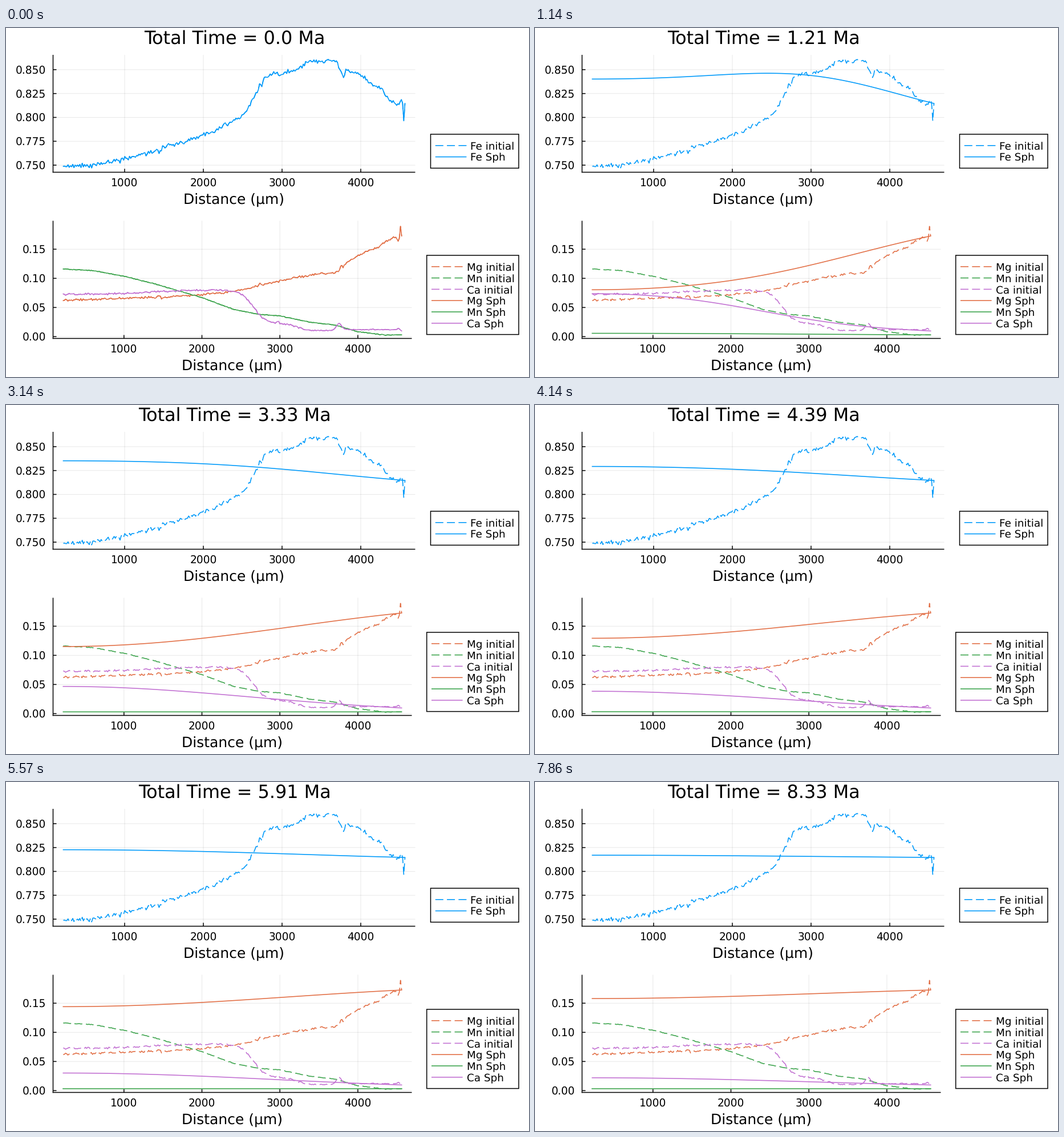
Write a matplotlib script that moves like this. It is 917 by 611 pixels and loops after 8000 ms.

```python
import numpy as np
import matplotlib.pyplot as plt
from matplotlib.animation import FuncAnimation
from matplotlib.patches import Rectangle

W, H = 917, 611
STATES = 56                         # pictures in one loop, seven per second
STEP = 15 / 99                      # Ma between pictures
TICK = 40                           # ms per drawn frame
LOOP = 8000
X0, X1 = 220.8, 4561.5              # profile ends, in micrometres
BLUE, ORANGE, GREEN, PURPLE = "#009afa", "#e26f46", "#3da44d", "#c271d2"
TRIO = (ORANGE, GREEN, PURPLE)
LW = 1.6
DASH = (14, 6.3)

plt.rcParams.update({"font.family": "DejaVu Sans", "text.hinting": "none",
                     "lines.scale_dashes": False})
rng = np.random.default_rng(4)


def rise(u, at, width):
    return 1 / (1 + np.exp(-(u - at) / width))


def bump(u, at, width):
    return np.exp(-((u - at) / width) ** 2)


def magnesium(u):
    trend = .0615 + .0042 * u + .0345 * rise(u, 2.85, .3)
    rim = .0155 * rise(u, 3.8, .025) + .064 * (np.clip(u, 3.84, 4.47) - 3.84)
    detail = (.0025 * bump(u, 1.435, .02) - .003 * bump(u, 1.49, .02)
              + .003 * bump(u, 2.74, .03) + .01 * bump(u, 3.787, .01)
              - .003 * bump(u, 4.24, .05))
    spike = .0205 * bump(u, 4.549, .008) - .007 * bump(u, 4.515, .015)
    return trend + rim + detail + spike


def manganese(u):
    keys = [(.2, .116), (.6, .1135), (1, .1035), (1.4, .0905), (2, .067), (2.4, .047),
            (2.75, .038), (3, .0355), (3.4, .0245), (3.72, .0195), (4, .0085), (4.35, .0027)]
    return np.interp(u, *zip(*keys)) + .0003 * rise(u, 4.45, .02)


def calcium(u):
    return (.0725 + .0075 * rise(u, 1.3, .25) - .058 * rise(u, 2.66, .08)
            - .0115 * rise(u, 3.22, .06) + .0015 * rise(u, 3.75, .05)
            + .011 * bump(u, 3.76, .05) + .003 * bump(u, 2.98, .02)
            + .0025 * bump(u, 4.52, .015) - .0025 * rise(u, 4.55, .005))


def jitter(u, size):
    return np.clip(rng.normal(0, size, u.size), -2 * size, 2 * size) * (u < 4.5)


def diffuse(c):
    """Multicomponent diffusion of Mg, Mn, Ca in a sphere with a fixed rim."""
    d = np.array([.2806, 3.02, .2038]) / np.pi ** 2
    d_fe = .4077 / np.pi ** 2
    n = c.shape[1]
    r = np.linspace(0, 1, n)
    mid = (r[1:] + r[:-1]) / 2
    vol = np.diff(np.concatenate([[0], mid, [1]]) ** 3) / 3
    diff = (np.eye(n, k=1) - np.eye(n))[:-1]
    grad = diff * (n - 1)
    div = -(diff.T * mid ** 2) / vol[:, None]
    div[-1] = 0
    unit = np.eye(3 * n)

    def block(i, j, face, total):
        k = d[i] * (i == j) - d[i] * face[i] * (d[j] - d_fe) / total
        return div @ (k[:, None] * grad)

    states = [c]
    for k in range(1, STATES):
        sub = 10 if k <= 10 else 3
        for _ in range(sub):
            face = (c[:, 1:] + c[:, :-1]) / 2
            total = d @ face + d_fe * (1 - face.sum(axis=0))
            op = np.block([[block(i, j, face, total) for j in range(3)] for i in range(3)])
            c = np.linalg.solve(unit - STEP / sub * op, c.ravel()).reshape(3, n)
        states.append(c)
    return states


fig = plt.figure(figsize=(917.001 / 72, 611.001 / 72), dpi=72, facecolor="white")
ax = fig.add_axes([0, 0, 1, 1])
ax.set_xlim(0, W)
ax.set_ylim(H, 0)
ax.axis("off")


def rule(x, y, color="black", lw=1.5, **kw):
    return ax.plot(x, y, color=color, lw=lw, snap=False, solid_capstyle="butt", **kw)[0]


def label(x, y, text, size, ha="center"):
    return ax.text(x, y, text, fontsize=size, ha=ha, va="baseline", color="black")


class Panel:
    """Plot area in stage pixels with linear data scales."""

    def __init__(self, right, top, bottom, ylim, ticks, fmt):
        self.left, self.right, self.top, self.bottom = 82.5, right, top, bottom
        self.ylim = ylim
        for v in (1000, 2000, 3000, 4000):
            x = self.px(v)
            rule([x, x], [top, bottom], lw=1, alpha=.09)
            rule([x, x], [bottom, bottom - 6])
            label(x, bottom + 24, str(v), 18.6)
        for v in ticks:
            y = self.py(v)
            rule([self.left, right], [y, y], lw=1, alpha=.09)
            rule([self.left, self.left + 6], [y, y])
            label(70.5, y + 6.7, fmt % v, 18.6, "right")
        rule([self.left, self.left], [top, bottom + .75])
        rule([self.left - .75, right], [bottom, bottom])
        label((self.left + right) / 2, bottom + 55.5, "Distance (µm)", 25)

    def px(self, v):
        return self.left + (np.asarray(v) - 90.6) / 4601.2 * (self.right - self.left)

    def py(self, v):
        lo, hi = self.ylim
        return self.bottom - (np.asarray(v) - lo) / (hi - lo) * (self.bottom - self.top)

    def curve(self, x, y, color, dashed=False):
        line = ax.plot(self.px(x), self.py(y), color=color, lw=LW)[0]
        if dashed:
            line.set_dashes(DASH)
        return line


def legend(left, top, rows):
    gap = 19.8
    ax.add_patch(Rectangle((left, top), 899 - left, gap * (len(rows) + 1), fc="white",
                           ec="black", lw=1.5, snap=False))
    for i, (name, color, dashed) in enumerate(rows, 1):
        y = top + gap * i
        line = rule([left + 8.3, left + 62.9], [y, y], color, LW)
        if dashed:
            line.set_dashes(DASH)
        label(left + 69.8, y + 7, name, 18.4, "left")


upper = Panel(717.5, 47, 252.5, (.7426, .8655), (.75, .775, .8, .825, .85), "%.3f")
lower = Panel(711.5, 337.5, 543.5, (-.0031, .1988), (0, .05, .1, .15), "%.2f")

x0 = np.linspace(X0, X1, 290)
u = x0 / 1000
trio0 = np.array([magnesium(u) + jitter(u, .001),
                  manganese(u) + jitter(u, .0003),
                  calcium(u) + jitter(u, .0008) * np.where(u < 3.3, 1, .5)])
fe0 = 1 - trio0.sum(axis=0) + .0035 * (bump(u, 3.98, .13) - bump(u, 4.38, .08))

grid = np.linspace(X0, X1, 120)
states = diffuse(np.array([f(grid / 1000) for f in (magnesium, manganese, calcium)]))

upper.curve(x0, fe0, BLUE, True)
for y, color in zip(trio0, TRIO):
    lower.curve(x0, y, color, True)
fe_line = upper.curve(x0, fe0, BLUE)
trio_lines = [lower.curve(x0, y, color) for y, color in zip(trio0, TRIO)]

legend(744.5, 186, [("Fe initial", BLUE, True), ("Fe Sph", BLUE, False)])
legend(737.7, 398, [(f"{el} {kind}", color, kind == "initial")
                    for kind in ("initial", "Sph")
                    for el, color in zip(("Mg", "Mn", "Ca"), TRIO)])
title = label(401, 28, "", 31.9)


def draw(i):
    k = (TICK * (i + 1) - 5) * 7 // 1000
    title.set_text(f"Total Time = {round(k * STEP, 2)} Ma")
    if k == 0:
        x, fe, trio = x0, fe0, trio0
    else:
        x, fe, trio = grid, 1 - states[k].sum(axis=0), states[k]
    fe_line.set_data(upper.px(x), upper.py(fe))
    for line, y in zip(trio_lines, trio):
        line.set_data(lower.px(x), lower.py(y))
    return [title, fe_line, *trio_lines]


anim = FuncAnimation(fig, draw, frames=LOOP // TICK, init_func=lambda: draw(0),
                     interval=TICK, repeat=True, repeat_delay=0, blit=False)
plt.show()
```
